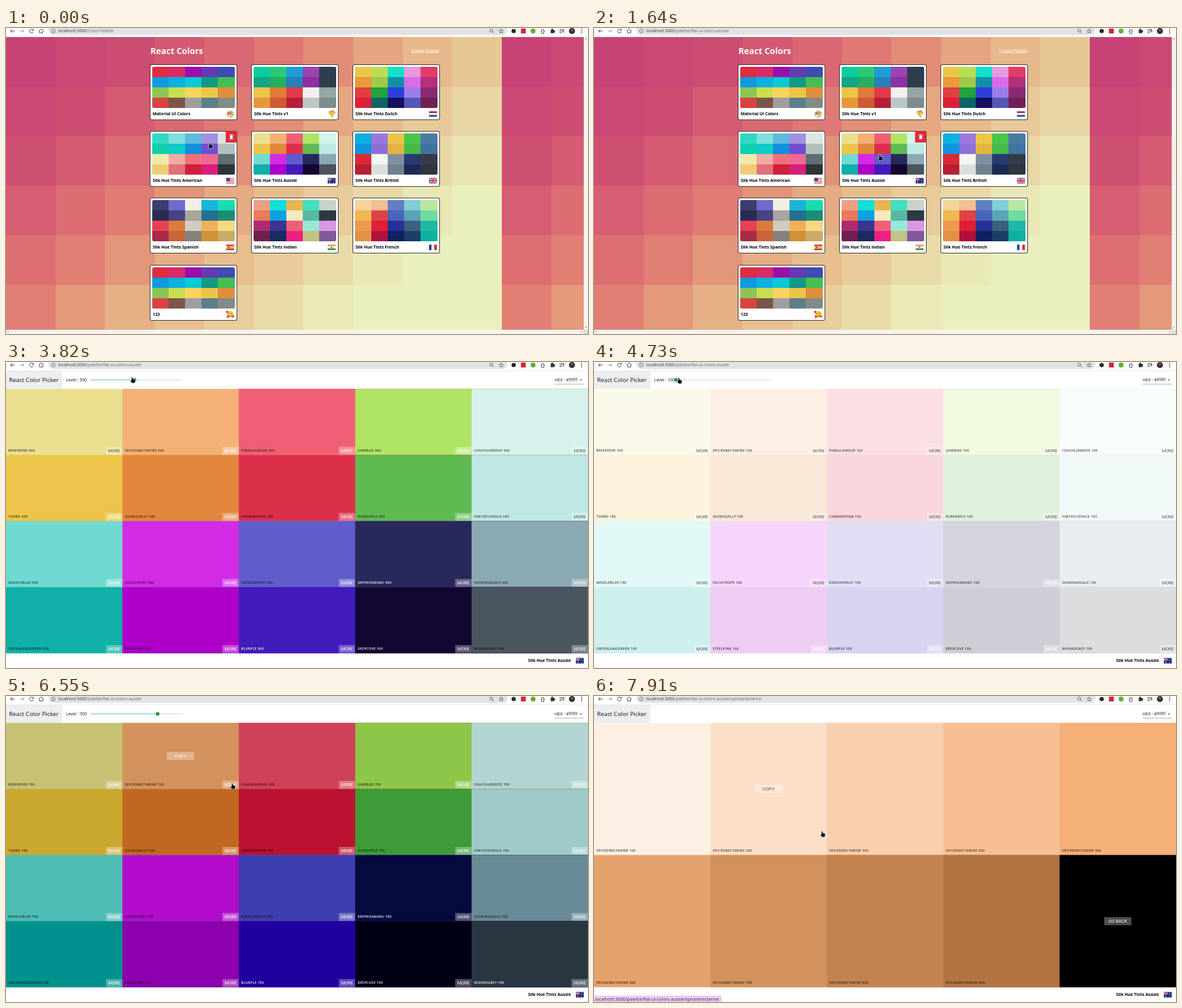
Animation, 959 px wide and 505 px high, one loop 8000 ms. Source, as an HTML page with a canvas:

```html
<!DOCTYPE html>
<html lang="en">
<head>
<meta charset="utf-8">
<title>React Color Picker</title>
<style>
html, body { margin: 0; width: 100%; height: 100%; overflow: hidden; background: #fff; }
canvas { display: block; }
</style>
</head>
<body>
<canvas id="stage" width="959" height="505"></canvas>
<script>
const W = 959, H = 505, LOOP = 8000, STEP = 90.9;
const TOP = 44.4, BOTTOM = 480.6;
const main = document.getElementById('stage').getContext('2d');
const layer = Object.assign(document.createElement('canvas'), { width: W, height: H });
const layerCtx = layer.getContext('2d');
let g = main;

const SANS = '"Open Sans", "Noto Sans", sans-serif';
const ROBOTO = 'Roboto, Arial, sans-serif';
const SET = 'Silk Hue Tints';
const HOST = 'localhost:3000';
const PATHS = ['/Color-Palette', '/palette/flat-ui-colors-aussie', '/palette/flat-ui-colors-aussie/spicednectarine'];

const MATERIAL = 'e02b41 d92b67 9a10a8 6939b4 3f4cb0 0f9ae0 0db0e0 0cc9d5 129a86 45be52 8bc653 c8de4e f7d45e ecc548 df8f3a d84440 7b5548 9e9e9e 5f7d89 808c84';
const AUSSIE = 'e9df8f f5b078 f05f74 b0e465 d5f3ec ecc54a e2863c dc304a 5fba52 c0e8e2 70dad0 d32be6 5f5ccb 29285a 8ba9b2 10afa8 ae00c8 421cba 120730 4b555e';
const CARDS = [
  ['Material UI Colors', 'paint', MATERIAL],
  [SET + ' v1', 'slice', '0ecb9f 2ac976 1f9cd8 9b45b0 2d3e50 12a586 22b060 2580b9 8e2fa4 2c3e4a ecc548 df7a38 e03a48 f2f0ee 95a5a6 e8983c cf5a34 b81f38 bdc6c6 7f8c8d'],
  [SET + ' Dutch', 'nl', 'ecc648 b8de55 12e0c8 e59adb e33c66 e89a3b a2c94a 1290a8 d96be8 b5307a e14040 22a33e 2b3fd8 9a7ee8 8a2a72 dc1f38 0d6663 17105f 5755b8 702055'],
  [SET + ' American', 'us', '2ed9c0 80dfd8 60b8dd a292de dde4e4 0fd0b0 0fcbc9 1090dd 6f4fd0 b3bfbf f3e8ac f0aaa5 f0707a ee6a94 5f6e72 f2cb78 e0707a d01f3a d8207a 2d3436'],
  [SET + ' Aussie', 'au', AUSSIE],
  [SET + ' British', 'gb', '0db0e0 9a77de ecc548 4ac64c 4a7ba6 1095dd 8e6fd8 e2b540 45ba48 3f73a0 dc2a35 f4f6f5 7f8fa0 283a72 353b48 b81f30 dadfde 70808f 192a56 2f3640'],
  [SET + ' Spanish', 'es', '3d3d72 706acd f4efe2 18b5d8 1bdcb0 2c2a54 474484 a8a59d 227093 1f8c74 e84055 dd7a3c d0ccbe efb05a f5da84 a82a44 c8663a 84817a cf9238 cdaa68'],
  [SET + ' Indian', 'in', 'ee9f84 12e0d5 eab550 40e0c0 cad3c8 ea7a58 0fa0e0 f4eabc 58b89f 2c3a42 ad2a72 3b3592 f05f78 98e8d8 d898e0 6d214f 1b2a60 ee2080 c0c480 82589f'],
  [SET + ' French', 'fr', 'f5d398 f3be92 5f80c0 80cfd8 b8e8a0 efb84e e04345 4a65b8 58a5b8 70dca0 ee9850 e01f35 28309a 3c6080 20b8a5 e29048 b0103c 102060 1a4068 0fb0a0'],
  ['123', 'face', MATERIAL]
].map(([name, icon, colors]) => ({ name, icon, colors: colors.split(' ').map(rgb) }));

const NAMES = ('BEEKEEPER SPICEDNECTARINE PINKGLAMOUR JUNEBUD COASTALBREEZE TURBO QUINCEJELLY CARMINEPINK PUREAPPLE HINTOFICEPACK ' +
  'MIDDLEBLUE HELIOTROPE EXODUSFRUIT DEEPKOAMARU SOARINGEAGLE GREENLANDGREEN STEELPINK BLURPLE DEEPCOVE WIZARDGREY').split(' ');

const RAMP = [[0, 'c84375'], [2, 'cc4c72'], [3.5, 'd76072'], [4.5, 'dc7072'], [5.5, 'e17f74'], [6.5, 'e3997a'],
  [7.5, 'e5b085'], [8.5, 'e8c090'], [9.7, 'e8d09f'], [11, 'e9e4b0'], [12, 'eaf0bd']].map(([s, h]) => [s, ...rgb(h)]);

const CURSOR = [[0, 337, 194], [360, 337, 194], [630, 400, 140], [810, 440, 110], [1000, 490, 130], [1180, 480, 190],
  [1450, 472, 214], [1730, 472, 214], [2090, 392, 217], [2450, 392, 217], [2640, 290, 185], [2730, 180, 135],
  [2910, 169, 111], [3090, 196, 50], [3270, 204, 38], [3820, 209, 30], [4000, 209, 30], [4450, 160, 31],
  [4730, 141, 31], [4820, 141, 31], [5090, 172, 31], [5270, 200, 31], [5450, 235, 31], [5730, 272, 31],
  [5910, 256, 32], [6090, 256, 33], [6360, 310, 95], [6550, 374, 149], [7730, 374, 152], [7820, 374, 155], [7910, 377, 228]];

const LEVELS = [[0, 500], [4090, 400], [4180, 300], [4360, 200], [4640, 100], [4910, 200], [5090, 300], [5180, 400],
  [5270, 500], [5360, 600], [5640, 700], [5730, 800], [5910, 700]];

const FADE_GRID = [[1730, 0], [2090, .82], [2450, 1]];
const FADE_SHADES = [[7180, 0], [7540, .82], [7730, 1]];

function rgb(hex) { return [0, 2, 4].map(i => parseInt(hex.substr(i, 2), 16)); }
function css(c) { return `rgb(${c.map(Math.round)})`; }
function lum(c) {
  const [r, gr, b] = c.map(v => (v /= 255) <= .03928 ? v / 12.92 : ((v + .055) / 1.055) ** 2.4);
  return .2126 * r + .7152 * gr + .0722 * b;
}

// Linear interpolation through rows of [position, values...]
function along(keys, p) {
  if (p <= keys[0][0]) return keys[0].slice(1);
  for (let i = 1; i < keys.length; i++) {
    const a = keys[i - 1], b = keys[i];
    if (p < b[0]) return a.slice(1).map((v, k) => v + (b[k + 1] - v) * (p - a[0]) / (b[0] - a[0]));
  }
  return keys[keys.length - 1].slice(1);
}

function shade(c, level) {
  const n = (level - 500) / 100;
  return n <= 0 ? c.map(v => v + (255 - v) * -n / 5) : c.map((v, i) => Math.max(0, v - n * [17, 15, 13.5][i]));
}

function rect(x, y, w, h, fill) { g.fillStyle = fill; g.fillRect(x, y, w, h); }
function round(x, y, w, h, r, fill) { g.fillStyle = fill; g.beginPath(); g.roundRect(x, y, w, h, r); g.fill(); }
function dot(x, y, r, fill) { g.fillStyle = fill; g.beginPath(); g.arc(x, y, r, 0, 7); g.fill(); }
function poly(pts, fill) {
  g.fillStyle = fill;
  g.beginPath();
  pts.forEach(([x, y]) => g.lineTo(x, y));
  g.closePath();
  g.fill();
}
function path(d, x, y, stroke, width = 1) {
  g.save();
  g.translate(x, y);
  g.strokeStyle = stroke;
  g.lineWidth = width;
  g.stroke(new Path2D(d));
  g.restore();
}
function text(s, x, y, size, color, { font = SANS, weight = 400, align = 'left', gap = 0 } = {}) {
  g.font = `${weight} ${size}px ${font}`;
  g.letterSpacing = gap + 'px';
  g.textAlign = align;
  g.fillStyle = color;
  g.fillText(s, x, y + size * .36);
  const width = g.measureText(s).width;
  g.letterSpacing = '0px';
  return width;
}

function stripes(x, y, colors, vertical) {
  colors.forEach((c, i) => {
    const n = colors.length;
    vertical ? rect(x + i * 13 / n, y, 13 / n, 9, c) : rect(x, y + i * 9 / n, 13, 9 / n, c);
  });
}
function cross(x, y, w, h, color, t) {
  rect(x, y + h / 2 - t / 2, w, t, color);
  rect(x + w / 2 - t / 2, y, t, h, color);
}
function jack(x, y, w, h) {
  rect(x, y, w, h, '#1d2f78');
  path(`M0 0L${w} ${h}M${w} 0L0 ${h}`, x, y, '#fff', h / 5);
  path(`M0 0L${w} ${h}M${w} 0L0 ${h}`, x, y, '#d02040', h / 12);
  cross(x, y, w, h, '#fff', h / 3);
  cross(x, y, w, h, '#d02040', h / 5);
}

const ICONS = {
  paint(x, y) {
    g.fillStyle = '#e2b078';
    g.beginPath();
    g.ellipse(x + 6.5, y + 4.5, 6.3, 5.6, -.3, 0, 7);
    g.fill();
    ['#d03040', '#3c78c8', '#48a850', '#f4d848'].forEach((c, i) => dot(x + 3 + i * 2.4, y + 2.6 + (i % 2) * 1.4, 1.2, c));
    dot(x + 5, y + 7.3, 1.5, '#fff');
  },
  slice(x, y) {
    poly([[x + 1, y + 2], [x + 9, y - 1], [x + 12, y + 3], [x + 8, y + 11]], '#ecc248');
    path('M2 1L9 -1L12 3', x, y, '#c88a38', 1.6);
    dot(x + 6, y + 4, 1, '#d89030');
    dot(x + 9, y + 5, 1, '#f8e498');
  },
  face(x, y) {
    dot(x + 6.5, y + 4, 5.6, '#f4c440');
    path('M3.5 3Q4.5 1.5 5.5 3M7.5 3Q8.5 1.5 9.5 3M4 6Q6.5 8.5 9 6', x, y, '#6a4420', .8);
    [[1.5, 0], [2.5, 8], [11, 7.5]].forEach(([a, b]) => dot(x + a, y + b, 1.8, '#dc2840'));
  },
  nl: (x, y) => stripes(x, y, ['#b02038', '#fff', '#28489c']),
  fr: (x, y) => stripes(x, y, ['#2840a0', '#f4f4f4', '#dc2c40'], true),
  us(x, y) {
    stripes(x, y, ['#d83848', '#fff', '#d83848', '#fff', '#d83848', '#fff', '#d83848']);
    rect(x, y, 6, 5, '#34488c');
  },
  es(x, y) {
    stripes(x, y, ['#c82038', '#f0c038', '#f0c038', '#c82038']);
    rect(x + 3, y + 3, 2.4, 3, '#a85030');
  },
  in(x, y) {
    stripes(x, y, ['#f09838', '#fff', '#3c9848']);
    dot(x + 6.5, y + 4.5, 1.2, '#4858a8');
  },
  gb: (x, y) => jack(x, y, 13, 9),
  au(x, y) {
    rect(x, y, 13, 9, '#1a2878');
    g.save();
    g.beginPath();
    g.rect(x, y, 6.5, 4.5);
    g.clip();
    jack(x, y, 6.5, 4.5);
    g.restore();
    [[3.2, 6.9], [9.7, 1.6], [9.7, 7.4], [8.2, 4], [11.3, 3.6]].forEach(([a, b], i) => dot(x + a, y + b, i ? .6 : .9, '#fff'));
  }
};

function browser(t) {
  rect(0, 0, W, 14, '#fff');
  rect(0, 14, W, .6, '#dfe0e2');
  round(70, -6, 756, 17.5, 8, '#e1e3e4');
  path('M4 0H-3M0 -3L-3 0L0 3', 10.5, 5, '#444');
  path('M-4 0H3M0 -3L3 0L0 3', 26.5, 5, '#999');
  path('M2.8 -1.5A3.2 3.2 0 1 0 3 1.2M3.2 -3.5V-1H.8', 42, 5, '#444');
  path('M-4 0L0 -3.5L4 0M-2.7 -.5V3.2H2.7V-.5', 58, 5, '#444');
  path('M3.2 0A3.2 3.2 0 1 1 -3.2 0A3.2 3.2 0 1 1 3.2 0M0 -.5V2M0 -2V-1.2', 78, 5, '#555', .7);
  const w = text(HOST, 86, 5, 6.9, '#333');
  text(PATHS[t < 1640 ? 0 : t < 7180 ? 1 : 2], 86 + w, 5, 6.9, '#666');
  path('M2 -.7A2.4 2.4 0 1 1 -2.8 -.7A2.4 2.4 0 1 1 2 -.7M1.3 1L3.8 3.5', 800, 5, '#555', .9);
  path('M0 -3.5L1 -1L3.6 -.9L1.6 .8L2.3 3.3L0 1.9L-2.3 3.3L-1.6 .8L-3.6 -.9L-1 -1Z', 816, 5, '#555', .8);
  dot(836.5, 5, 3.6, '#2a2a2a');
  rect(848.5, 1, 8, 8, '#d02838');
  dot(868.5, 5, 4, '#62ac30');
  text('{}', 884.5, 4.5, 9, '#333', { align: 'center', weight: 600 });
  rect(897.5, 3, 6, 5.5, '#333');
  dot(900, 2.4, 1.4, '#333');
  dot(903.5, 5.4, 1.4, '#333');
  path('M-4 -2.5H3M-4 0H3M-4 2.5H0M3 -2.5V2.5', 916, 5, '#444', 1.1);
  dot(932.5, 5, 5, '#3a3034');
  dot(932.5, 3.6, 1.6, '#8c7474');
  [2, 5, 8].forEach(y => dot(948.5, y, .9, '#444'));
}

function backdrop() {
  const size = 81.7;
  for (let r = 0; r < 6; r++) for (let c = 0; c < 12; c++) {
    const x = Math.round(c * size), y = Math.round(15 + r * size);
    rect(x, y, W - x, H - y, css(along(RAMP, c % 10 + 1.1 * r)));
  }
  rect(952, 15, 7, 490, '#f5f3ef');
  rect(0, 498, W, 7, '#f5f3ef');
  rect(952, 498, 7, 7, '#dcdcdc');
  poly([[2, 501.5], [4, 500], [4, 503]], '#888');
  poly([[950, 501.5], [948, 500], [948, 503]], '#888');
  poly([[955.5, 17], [954, 19], [957, 19]], '#888');
  poly([[955.5, 495], [954, 493], [957, 493]], '#888');
}

const cardAt = i => [Math.round(237 + (i % 3) * 166.9), Math.round(60 + Math.floor(i / 3) * 110.2)];

function home(mx, my) {
  backdrop();
  text('React Colors', 238, 37.5, 14, '#fff', { weight: 700 });
  const w = text('Create Palette', 714, 37, 7.1, '#fff', { align: 'right' });
  rect(714 - w, 40.3, w, .7, '#fff');
  CARDS.forEach((card, i) => {
    const [x, y] = cardAt(i);
    round(x, y, 144, 92, 3.5, '#333');
    round(x + 1, y + 1, 142, 90, 2.5, '#fff');
    g.save();
    g.beginPath();
    g.roundRect(x + 4, y + 4, 136, 68, 2.5);
    g.clip();
    card.colors.forEach((c, k) => rect(x + 4 + (k % 5) * 27, y + 4 + Math.floor(k / 5) * 17, 28, 17, css(c)));
    g.restore();
    text(card.name, x + 4.7, y + 81.7, 6.9, '#000', { weight: 700 });
    ICONS[card.icon](x + 126, y + 77.5);
    if (mx > x && mx < x + 144 && my > y && my < y + 92) {
      round(x + 125, y + .5, 18.5, 18.5, [0, 3, 0, 0], '#dd2e40');
      rect(x + 132, y + 8, 4.6, 5.4, '#fff');
      rect(x + 131.2, y + 6.4, 6.2, 1, '#fff');
      rect(x + 133, y + 5.7, 2.6, 1, '#fff');
    }
  });
}

function header() {
  rect(0, 14, W, H - 14, '#fff');
  rect(0, 14.5, 93, 30, '#eceeef');
  text('React Color Picker', 5, 29.5, 9.75, '#111');
  text('HEX - #ffffff', 904, 29.3, 7, '#333', { font: ROBOTO });
  poly([[945, 28.8], [949.4, 28.8], [947.2, 31]], '#666');
  rect(904, 36, 48, .8, '#999');
  text(SET + ' Aussie', 931, 493, 6.9, '#000', { weight: 700, align: 'right' });
  ICONS.au(939, 488.5);
}

function button(label, x, y, w, color, size, bg = 'rgba(255,255,255,.3)') {
  rect(x - w / 2, y - 6.7, w, 13.4, bg);
  text(label, x, y, size, color, { font: ROBOTO, align: 'center' });
}

// Each cell fills what lies right and below; later cells cover the rest
function cell(i, rows, c, label, mouse, more) {
  const w = W / 5, h = (BOTTOM - TOP) / rows;
  const x = (i % 5) * w, y = TOP + Math.floor(i / 5) * h;
  rect(x, y, W - x, BOTTOM - y, css(c));
  const ink = lum(c) >= .7 ? 'rgba(0,0,0,.65)' : '#fff';
  if (label) text(label, x + 4, y + h - 7.5, 5.3, lum(c) < .065 ? '#fff' : 'rgba(0,0,0,.75)', { weight: 600, gap: .4 });
  else button('GO BACK', x + w / 2, y + h / 2, 45, '#fff', 7.4);
  if (more) button('MORE', x + w - 13.5, y + h - 6.7, 27, ink, 7.2);
  const [mx, my] = mouse;
  if (label && mx >= x && mx < x + w && my >= y && my < y + h) button('COPY', x + w / 2, y + h / 2, 45, ink, 7.7);
}

function grid(level, mouse) {
  header();
  text('Level : ' + level, 99, 29.5, 7.05, '#111');
  const knob = 135.5 + (level - 100) * .1905;
  round(139, 28.6, 152, 1.7, 1, '#e0e2e2');
  round(139, 28.6, Math.max(1, knob - 139), 1.7, 1, '#a5dbe6');
  dot(knob, 29.6, 3, '#229a2c');
  const cells = CARDS[4].colors;
  for (let row = 0; row < 4; row++) for (let i = row * 5; i < row * 5 + 5; i++)
    cell(i, 4, shade(cells[i], level), NAMES[i] + ' ' + level, mouse, true);
}

function shades(mouse) {
  header();
  for (let i = 0; i < 9; i++) {
    const level = (i + 1) * 100;
    cell(i, 2, shade(CARDS[4].colors[1], level), NAMES[1] + ' ' + level, mouse);
  }
  cell(9, 2, [0, 0, 0], '', mouse);
}

function fade(alpha, draw) {
  if (alpha <= 0) return;
  g = layerCtx;
  g.clearRect(0, 0, W, H);
  draw();
  g = main;
  g.globalAlpha = alpha;
  g.drawImage(layer, 0, 0);
  g.globalAlpha = 1;
}

// The old page fades out towards white while the new one fades in over it
function swap(p, before, after) {
  rect(0, 0, W, H, '#fff');
  fade((1 - p) ** .6, before);
  fade(p, after);
}

function pointer(x, y, hand) {
  const shape = new Path2D(hand
    ? 'M-2 -4.5Q-1 -5.2 -.3 -4.2V-1.8L3 -1Q4 -.6 3.8 .8L3 4.5H-1.4L-4 1.2Q-3.6 -.2 -2 .8Z'
    : 'M-.5 0V8L1.4 6.3L2.6 9L4 8.4L2.8 5.8H5.2Z');
  g.save();
  g.translate(x, y);
  g.strokeStyle = '#fff';
  g.lineWidth = 1.2;
  g.stroke(shape);
  g.fillStyle = '#0a0a14';
  g.fill(shape);
  g.restore();
}

function draw(now) {
  const t = Math.floor(now % LOOP / STEP + .08) * STEP + 5;
  const mouse = along(CURSOR, t);
  const level = LEVELS.filter(k => t >= k[0]).pop()[1];
  const hover = t < 2270 ? [-1, -1] : mouse;
  const showHome = () => home(...(t < 1640 ? mouse : [472, 214]));
  const showGrid = () => grid(level, hover);
  g = main;
  if (t < 4000) swap(along(FADE_GRID, t)[0], showHome, showGrid);
  else swap(along(FADE_SHADES, t)[0], showGrid, () => shades(hover));
  browser(t);
  if (t >= 6640) {
    round(0, 494.5, 210, 11, [0, 2, 0, 0], '#ecc9f0');
    text(HOST + PATHS[2], 2, 500, 7.4, '#333');
  }
  pointer(...mouse, t < 1820 || (t >= 3270 && t < 6180) || t >= 6500);
}

function tick(now) {
  draw(now);
  requestAnimationFrame(tick);
}
requestAnimationFrame(tick);
</script>
</body>
</html>
```
